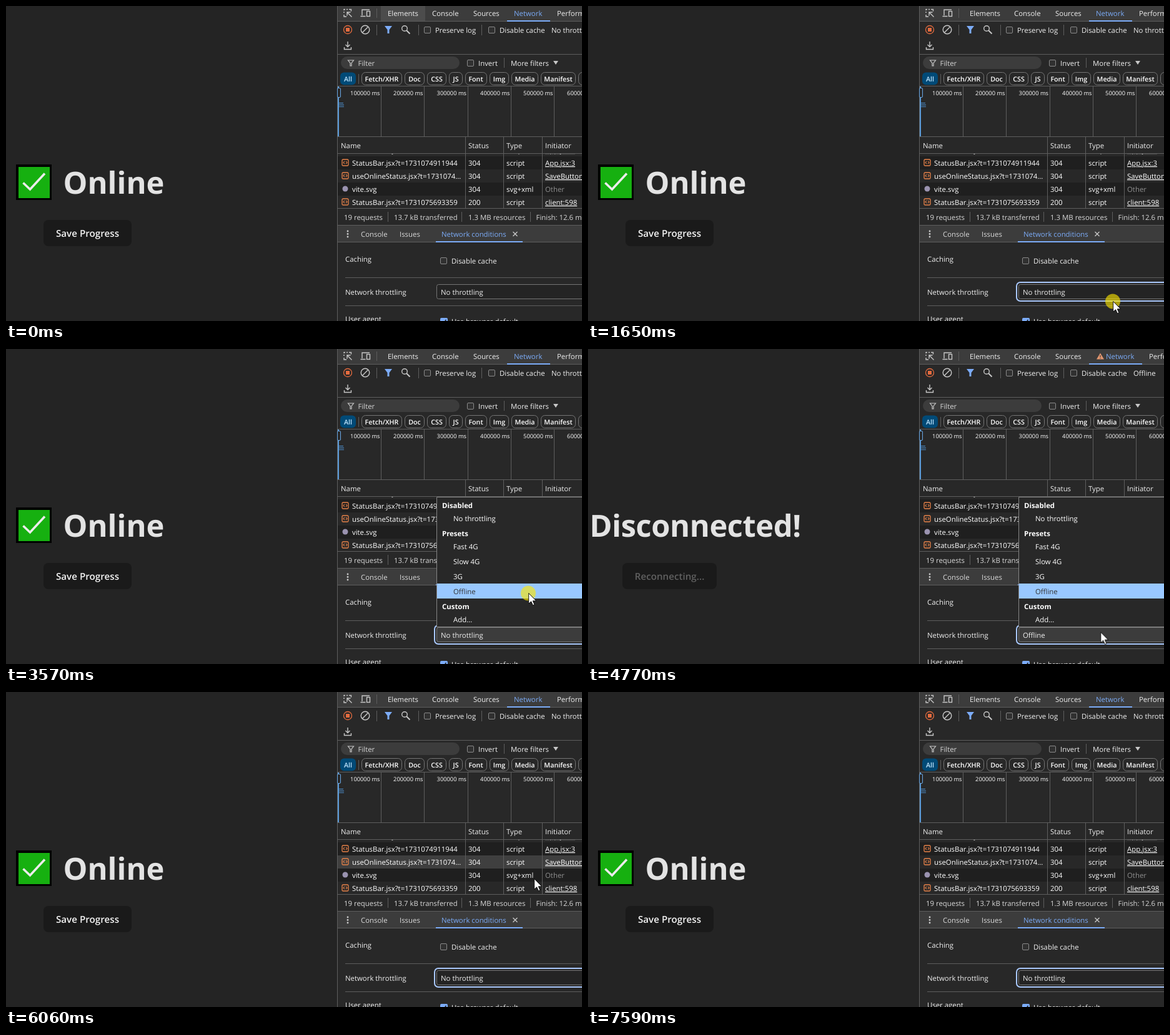
An HTML page for the animation above (7.73 s loop, 922 by 505 pixels).

```html
<!DOCTYPE html>
<html lang="en">
<head>
<meta charset="utf-8">
<title>Online status demo</title>
<style>
html, body { margin: 0; width: 100%; height: 100%; overflow: hidden; background: #242424; }
svg { display: block; }
text { font-family: "Open Sans", "Noto Sans", sans-serif; text-rendering: geometricPrecision; white-space: pre; }
.ui { font-size: 11.4px; fill: #efefef; }
.b { font-weight: 700; }
.blue { fill: #7cacf8; }
.h1 { font-size: 48.9px; font-weight: 700; fill: #e3e3e3; }
.tight { letter-spacing: -.45px; }
.btn { font-size: 15.2px; font-weight: 600; text-anchor: middle; }
.chips { font-size: 10.7px; font-weight: 600; text-anchor: middle; fill: #fff; }
.chips rect { fill: none; stroke: #757575; }
.ticks { font-size: 9.3px; font-weight: 500; text-anchor: end; fill: #fff; }
.rows, .menu { fill: #fff; }
.link { text-decoration: underline; }
.line { fill: none; stroke: #5e5e5e; }
.box { fill: #303030; stroke: #8a8a8a; }
.icon { fill: none; stroke: #c7c7c7; stroke-width: 1.4; }

/* one loop is 7.73 s; all state switches are hard */
.on, .off, .tabHover, .rowHover, .selHover, .ring, .menu, .click, .hl { animation: 7.73s step-end infinite; }
.on { animation-name: on; }
.off { animation-name: off; }
.tabHover { animation-name: tabHover; }
.rowHover { animation-name: rowHover; }
.selHover { animation-name: selHover; }
.ring { animation-name: ring; }
.menu { animation-name: menu; }
.click { animation-name: click; }
.hl { animation-name: hl; }
.cursor { animation: move 7.73s linear infinite; }

@keyframes on { 0%, 76.71% { opacity: 1 } 47.73% { opacity: 0 } }
@keyframes off { 0%, 76.71% { opacity: 0 } 47.73% { opacity: 1 } }
@keyframes tabHover { 0% { opacity: 1 } 4.39%, 100% { opacity: 0 } }
@keyframes ring { 0% { opacity: 0 } 21.34%, 100% { opacity: 1 } }
@keyframes menu {
  0%, 47.73%, 76.71%, 100% { opacity: 0 }
  23.15%, 60.02% { opacity: 1 }
}
@keyframes click {
  0%, 23.15%, 47.73%, 60.02%, 76.71%, 100% { opacity: 0 }
  21.34%, 46.18%, 58.21%, 75.8% { opacity: 1 }
}
@keyframes selHover {
  0%, 10.47%, 47.73%, 76.71%, 93.6%, 100% { opacity: 0 }
  9.91%, 23.15%, 54.37%, 83.82% { opacity: 1 }
}
@keyframes rowHover {
  0%, 8.3%, 79.75%, 100% { opacity: 0; transform: translateY(0) }
  7.4% { opacity: 1; transform: translateY(0) }
  7.63%, 76.71% { opacity: 1; transform: translateY(21px) }
  7.85% { opacity: 1; transform: translateY(42px) }
  8.07%, 79.3% { opacity: 1; transform: translateY(63px) }
}
@keyframes hl {
  0%, 71.35%, 100% { transform: translateY(0) }
  32.73%, 62.13% { transform: translateY(162px) }
  41.13%, 64.06% { transform: translateY(117px) }
  65.08% { transform: translateY(93px) }
  66.11% { transform: translateY(69px) }
  67.14% { transform: translateY(45px) }
}
@keyframes move {
  0%, 3.48% { transform: translate(648px, 14px); opacity: 0 }
  3.49% { transform: translate(648px, 14px); opacity: 1; animation-timing-function: ease-in-out }
  11.51%, 13.32% { transform: translate(847px, 486px) }
  18.62%, 25.87% { transform: translate(841px, 474px) }
  30.91%, 31.82% { transform: translate(840px, 457px) }
  34.41%, 39.58% { transform: translate(840px, 434px) }
  41.78%, 50.97% { transform: translate(837px, 392px) }
  55.36%, 60.8% { transform: translate(821px, 463px) }
  61.7% { transform: translate(821px, 455px) }
  67.91%, 68.82% { transform: translate(843px, 310px) }
  70.5% { transform: translate(845px, 289px) }
  73.22%, 77.49% { transform: translate(846px, 270px) }
  78.39%, 79.3% { transform: translate(846px, 300px) }
  84.34%, 92.88% { transform: translate(846px, 464px); opacity: 1 }
  98.18% { transform: translate(850px, 508px); opacity: 1 }
  98.19%, 100% { transform: translate(850px, 508px); opacity: 0 }
}
</style>
</head>
<body>
<svg width="922" height="505" viewBox="0 0 922 505">
  <defs>
    <clipPath id="table"><path d="M531 237h391v88H531z"/></clipPath>
    <clipPath id="pick"><rect class="hl" x="690" y="259" width="240" height="24"/></clipPath>
    <g id="script" fill="none" stroke="#e8834a" stroke-width="1.3">
      <rect x="-5" y="-5" width="10" height="10" rx="1.5"/>
      <path d="M-1-2.2L-3 0l2 2.2M1-2.2L3 0L1 2.2" stroke-width="1.1"/>
    </g>
    <rect id="check" class="box" x=".5" y=".5" width="10" height="10" rx="1.5"/>
  </defs>

  <!-- page -->
  <path d="M0 0h530v505H0z" fill="#242424"/>
  <g class="on">
    <path d="M16 254h57v57H16z" fill="#000"/>
    <path d="M20 258h50v50H20z" fill="#16b010"/>
    <path d="M27.5 283.5L38.5 294L62 268.5" fill="none" stroke="#ececec" stroke-width="3.6"/>
    <text class="h1" x="91.5" y="301">Online</text>
    <rect x="60" y="343" width="141" height="42" rx="8" fill="#1a1a1a"/>
    <text class="btn" x="130.5" y="370" fill="#f4f4f4">Save Progress</text>
  </g>
  <g class="off">
    <text class="h1 tight" x="2.5" y="301">Disconnected!</text>
    <rect x="55" y="343" width="151" height="42" rx="8" fill="#1a1a1a"/>
    <text class="btn" x="130.5" y="370" fill="#606060">Reconnecting...</text>
  </g>

  <!-- panel -->
  <path d="M531 0h391v505H531z" fill="#282828"/>
  <path d="M531 0h391v24H531zM531 352h391v26H531z" fill="#3c3c3c"/>
  <path class="tabHover" d="M600 0h71v24h-71z" fill="#4c4c4c"/>
  <path d="M531 241h391v21H531zM531 283h391v21H531z" fill="#1f1f1f"/>
  <path class="rowHover" d="M531 241h391v21H531z" fill="#3f3f3f"/>
  <path class="line" d="M530.5 0v505M531 24.5h391M531 77.5h391M531 128.5h391M531 209.5h391M531 236.5h391M531 324.5h391M531 351.5h391M531 378.5h391M543 435.5h379M543 480.5h379
    M593.5 4v15M593.5 30v17M660.5 30v17M761.5 30v17M797.5 83v16M564.5 109v16
    M600.5 129v80M669.5 129v80M739.5 129v80M808.5 129v80M877.5 129v80
    M735.5 210v115M796.5 210v115M858.5 210v115M611.5 330v16M729.5 330v16M839.5 330v16"/>

  <!-- toolbar icons -->
  <g class="icon">
    <path d="M545 17h-4v-3M541 11v-2M541 7V5.5h2M545 5.5h2M549 5.5h3.5v3M546 10l7.5 7.5M546 15.5V10h5.5"/>
    <path d="M570 15V6h12M567.5 16.5h8"/>
    <rect x="577.5" y="8.5" width="5" height="8"/>
    <circle cx="575" cy="38" r="6.8"/><path d="M570.5 42.500l9-9"/>
    <circle cx="638" cy="36" r="4.3"/><path d="M641 39l5.5 5.5" stroke-width="2"/>
    <path d="M547 57v8M543.5 62l3.5 3.5l3.5-3.5M541.5 66v3.5h11V66"/>
    <path d="M547.5 87h9l-3.5 4.5V96h-2v-4.5z" stroke-width="1.2"/>
    <path d="M811.5 362l7 7M818.5 362l-7 7"/>
  </g>
  <circle cx="547" cy="38" r="6.5" fill="none" stroke="#e46b3f" stroke-width="1.3"/>
  <path d="M544 35h6v6h-6z" fill="#e46b3f"/>
  <path d="M606 32h12l-4.5 6v6h-3v-6z" fill="#7cacf8"/>
  <path d="M876 88h8l-4 6z" fill="#c7c7c7"/>
  <g fill="#c7c7c7"><circle cx="547" cy="361" r="1.4"/><circle cx="547" cy="365.5" r="1.4"/><circle cx="547" cy="370" r="1.4"/></g>
  <use href="#check" x="669" y="33"/><use href="#check" x="772" y="33"/>
  <use href="#check" x="738" y="86"/><use href="#check" x="695" y="403"/>
  <rect x="536" y="81" width="190" height="20" rx="10" fill="#3c3c3c"/>
  <path class="icon" d="M547.5 87h9l-3.5 4.5V96h-2v-4.5z" style="stroke-width:1.2"/>

  <!-- tabs and toolbar -->
  <g class="ui">
    <text x="611" y="16">Elements</text><text x="682" y="16">Console</text><text x="748" y="16">Sources</text>
    <g class="on">
      <text class="blue" x="813" y="16">Network</text><text x="882" y="16">Performance</text>
      <path class="blue" d="M802 23h69v2h-69z"/>
      <text x="873" y="43">No throttling</text>
    </g>
    <g class="off">
      <path d="M820 6.5l6 10h-12z" fill="#e2966f"/>
      <path d="M819.4 10h1.2v3h-1.2zM819.4 14h1.2v1.2h-1.2z" fill="#3c3c3c"/>
      <text class="blue" x="829" y="16">Network</text><text x="898" y="16">Performance</text>
      <path class="blue" d="M802 23h85v2h-85z"/>
      <text x="873" y="43">Offline</text>
    </g>
    <text x="687" y="43">Preserve log</text><text x="790" y="43">Disable cache</text>
    <text x="563.5" y="96" fill="#d5d5d5">Filter</text><text x="756" y="96">Invert</text><text x="808" y="96">More filters</text>
  </g>

  <!-- type filters -->
  <g class="chips">
    <rect x="535" y="106.5" width="25" height="20" rx="6" style="fill:#004a77;stroke:none"/>
    <text x="547.5" y="121" fill="#c2e7ff">All</text>
    <rect x="569.5" y="106.5" width="64" height="20" rx="6"/><text x="601.5" y="121">Fetch/XHR</text>
    <rect x="638.5" y="106.5" width="31" height="20" rx="6"/><text x="654" y="121">Doc</text>
    <rect x="674.5" y="106.5" width="30" height="20" rx="6"/><text x="689.5" y="121">CSS</text>
    <rect x="709.5" y="106.5" width="21" height="20" rx="6"/><text x="720" y="121">JS</text>
    <rect x="735.5" y="106.5" width="34" height="20" rx="6"/><text x="752" y="121">Font</text>
    <rect x="774.5" y="106.5" width="30" height="20" rx="6"/><text x="789.5" y="121">Img</text>
    <rect x="809.5" y="106.5" width="42" height="20" rx="6"/><text x="830.5" y="121">Media</text>
    <rect x="856.5" y="106.5" width="55" height="20" rx="6"/><text x="884" y="121">Manifest</text>
    <rect x="916.5" y="106.5" width="40" height="20" rx="6"/>
  </g>

  <!-- overview -->
  <g class="ticks">
    <text x="598.5" y="143">100000 ms</text><text x="667.5" y="143">200000 ms</text><text x="737" y="143">300000 ms</text>
    <text x="806.5" y="143">400000 ms</text><text x="875.5" y="143">500000 ms</text><text x="945.5" y="143">600000 ms</text>
  </g>
  <path d="M531 129h2v80h-2z" fill="#5b9bd8"/>
  <rect x="530.5" y="131.5" width="5" height="15" rx="1.5" fill="#282828" stroke="#6aa9e6"/>
  <path d="M533 155h7v1.300h-7zM533 158h8v1.200h-8zM533 161h8v1h-8z" fill="#4a86c0"/>

  <!-- request table -->
  <g class="ui">
    <text x="536" y="228">Name</text><text x="740" y="228">Status</text><text x="801" y="228">Type</text><text x="863" y="228">Initiator</text>
  </g>
  <g class="ui rows" clip-path="url(#table)">
    <text x="554" y="235">SaveButton.jsx?t=1731074911944</text><text x="801" y="235">script</text><text class="link" x="863" y="235">App.jsx:2</text>
    <use href="#script" x="543" y="251"/>
    <text x="554" y="256">StatusBar.jsx?t=1731074911944</text><text x="740" y="256">304</text><text x="801" y="256">script</text><text class="link" x="863" y="256">App.jsx:3</text>
    <use href="#script" x="543" y="272"/>
    <text x="554" y="277">useOnlineStatus.jsx?t=1731074...</text><text x="740" y="277">304</text><text x="801" y="277">script</text><text class="link" x="863" y="277">SaveButton.jsx:2</text>
    <circle cx="543" cy="293" r="4.5" fill="#9a93b0"/>
    <text x="554" y="298">vite.svg</text><text x="740" y="298">304</text><text x="801" y="298">svg+xml</text><text x="863" y="298" fill="#8f8f8f">Other</text>
    <use href="#script" x="543" y="314"/>
    <text x="554" y="319">StatusBar.jsx?t=1731075693359</text><text x="740" y="319">200</text><text x="801" y="319">script</text><text class="link" x="863" y="319">client:598</text>
  </g>
  <g class="ui" style="fill:#d8d8d8">
    <text x="541" y="343">19 requests</text><text x="621" y="343">13.7 kB transferred</text><text x="740" y="343">1.3 MB resources</text><text x="848.5" y="343">Finish: 12.6 min</text>
    <text x="568" y="370">Console</text><text x="630" y="370">Issues</text><text class="blue" x="697" y="370">Network conditions</text>
  </g>
  <path class="blue" d="M688 377h139v2H688z"/>

  <!-- network conditions -->
  <g class="ui">
    <text x="543" y="410">Caching</text><text x="713" y="413">Disable cache</text>
    <text x="543" y="463">Network throttling</text>
    <text x="543" y="506">User agent</text><text x="713" y="510">Use browser default</text>
    <rect x="695" y="500" width="12" height="12" rx="2" fill="#7cacf8"/>
    <path d="M698 506l2.5 2.5l4-5.5" fill="none" stroke="#1f1f1f" stroke-width="1.5"/>
    <rect x="689.5" y="446.5" width="260" height="23" rx="3" fill="#242424" stroke="#757575"/>
    <rect class="selHover" x="689.5" y="446.5" width="260" height="23" rx="3" fill="#3c3c3c" stroke="#757575"/>
    <rect class="ring" x="686" y="443" width="267" height="30" rx="6" fill="none" stroke="#a8c7fa" stroke-width="2"/>
    <text class="on" x="696" y="463">No throttling</text><text class="off" x="696" y="463">Offline</text>
  </g>

  <!-- dropdown -->
  <g class="ui menu">
    <path d="M689.5 237.5h260v208h-260z" fill="#282828" stroke="#858585"/>
    <text class="b" x="698" y="255">Disabled</text><text class="b" x="698" y="300">Presets</text><text class="b" x="698" y="417">Custom</text>
    <g id="items">
      <text x="716" y="276">No throttling</text><text x="716" y="321">Fast 4G</text><text x="716" y="345">Slow 4G</text>
      <text x="716" y="369">3G</text><text x="716" y="393">Offline</text><text x="716" y="438">Add...</text>
    </g>
    <g clip-path="url(#pick)">
      <path d="M690 238h240v207H690z" fill="#99c8ff"/>
      <use href="#items" fill="#333"/>
    </g>
  </g>

  <!-- pointer -->
  <g class="cursor">
    <circle class="click" cx="-1" cy="-.5" r="12" fill="#ffe800" fill-opacity=".62"/>
    <path d="M-.3-.5V16.300L3.600 12.700L6.400 18.800L8.900 17.700L6.300 11.800H11.700z" fill="#fff" stroke="#000" stroke-width=".9"/>
  </g>
</svg>
</body>
</html>
```
